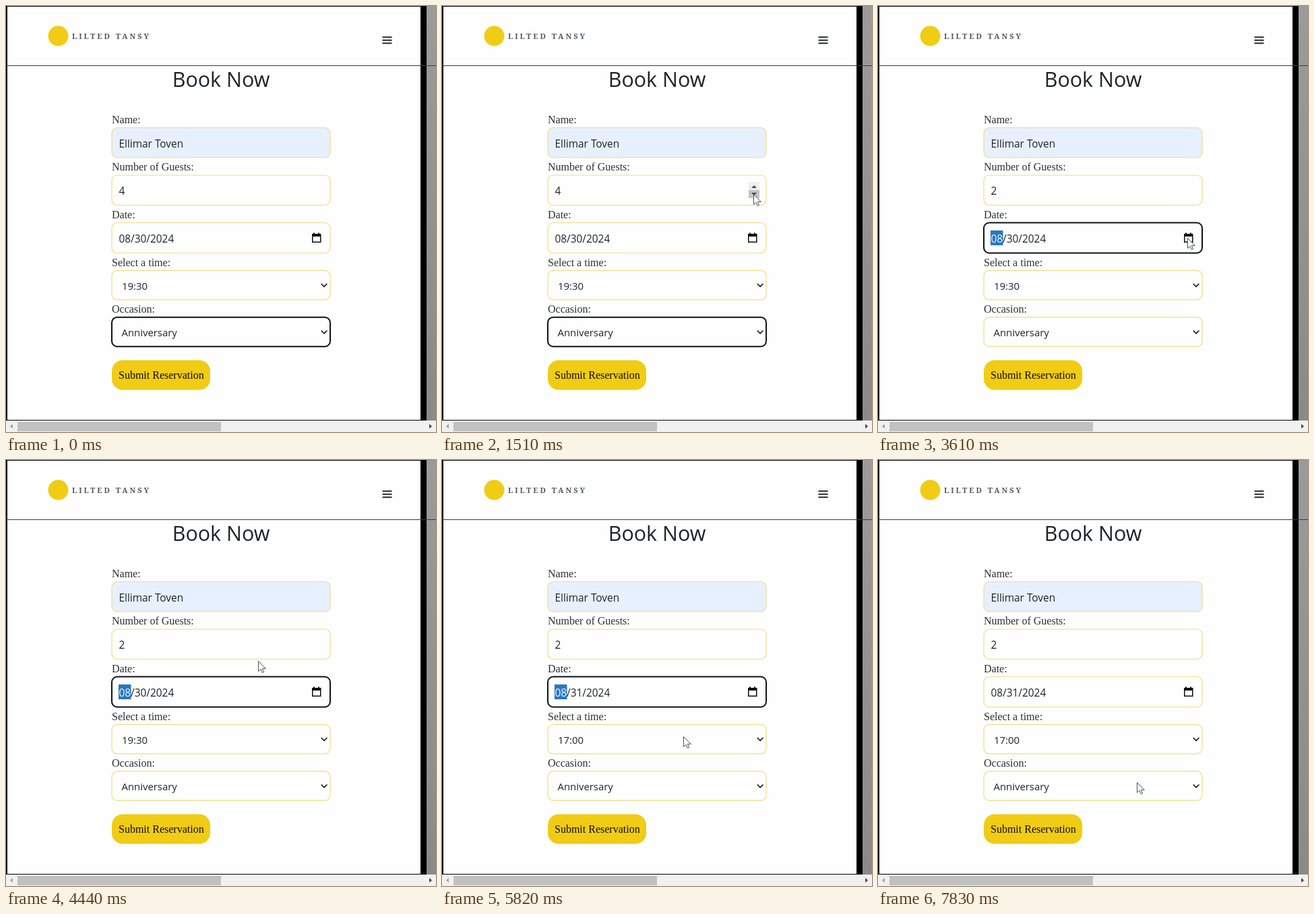
Recreate the animation shown at these times as an HTML page. Size 638 by 632 pixels, loop 8000 ms.

```html
<!DOCTYPE html>
<html lang="en">
<head>
<meta charset="utf-8">
<title>Book Now</title>
<style>
  html, body { margin: 0; width: 100%; height: 100%; overflow: hidden; background: #fefefe; }
  svg { display: block; width: 100%; height: 100%; }
  text { white-space: pre; }
  .sans { font-family: "Open Sans", "Noto Sans", sans-serif; fill: #1f2326; }
  .label { font: 16px "Liberation Serif", "Times New Roman", serif; fill: #2c2f31; }
  .field { stroke: #f2dc80; stroke-width: 1.2; fill: #fefefe; }
  .field.focus { stroke: #101113; stroke-width: 2; }
  .brand { font: bold 11px "Noto Serif", serif; letter-spacing: 3px; fill: #4e565c; }
  .chevron { fill: none; stroke: #15181a; stroke-width: 1.7; }
</style>
</head>
<body>
<svg viewBox="0 0 638 632" preserveAspectRatio="none">
  <defs>
    <linearGradient id="shade" x1="0" y1="0" x2="0" y2="1">
      <stop offset="0" stop-color="#9b9b9b"/>
      <stop offset="1" stop-color="#8a8a8a"/>
    </linearGradient>
  </defs>

  <!-- Page frame -->
  <rect width="638" height="632" fill="#fefefe"/>
  <rect x="623" width="15" height="615" fill="url(#shade)"/>
  <path d="M0 0H624V615H0Z M2 1V614H615V1Z" fill="#000" fill-rule="evenodd"/>
  <rect y="88" width="638" height="1" fill="#3a3a3a"/>

  <!-- Header -->
  <circle cx="77.5" cy="44.5" r="15" fill="#f1cc14"/>
  <text class="brand" x="98" y="49">LILTED TANSY</text>
  <path d="M558.5 46.2h14M558.5 50.7h14M558.5 55.2h14" stroke="#24282b" stroke-width="2"/>
  <text class="sans" x="319" y="120" font-size="30.4" font-weight="500" text-anchor="middle">Book Now</text>

  <!-- Form -->
  <g id="form"></g>
  <g class="sans">
    <text x="167.5" y="209.5" font-size="15.4">Ellimar Toven</text>
    <text id="guests" x="167.5" y="280" font-size="15.4"></text>
    <rect id="mark" x="167" y="333" width="18.5" height="22" fill="#2a77c0"/>
    <text x="167.5" y="350.5" font-size="15.4"><tspan id="month">08</tspan><tspan id="rest"></tspan></text>
    <text id="hour" x="172" y="420.5" font-size="14.9"></text>
    <text x="171.5" y="490" font-size="14.9">Anniversary</text>
  </g>
  <path class="chevron" d="M467.8 412l4.3 4.3l4.3 -4.3M467.8 481.5l4.3 4.3l4.3 -4.3"/>
  <path d="M454 338h2v-1.5h2v1.5h5v-1.5h2v1.5h2.5v13h-13.5Z M455.5 342v7.5h10.5v-7.5Z" fill="#0c0d0e" fill-rule="evenodd"/>
  <g id="spinner">
    <rect x="455" y="261" width="16" height="24" fill="#efefef"/>
    <rect id="down" x="455" y="273" width="16" height="12"/>
    <path d="M459 270h8l-4 -4ZM459 277h8l-4 4Z" fill="#484848"/>
  </g>
  <rect x="157" y="525.5" width="146" height="44" rx="16" fill="#f1cc14"/>
  <text class="label" x="167" y="553" style="fill:#0b0b0b">Submit Reservation</text>

  <!-- Scroll bar -->
  <rect y="615" width="638" height="17" fill="#f1f1f1"/>
  <rect x="17" y="617" width="302" height="14" fill="#c1c1c1"/>
  <path d="M10 620v7l-4 -3.5Z" fill="#a0a0a0"/>
  <path d="M628 620v7l4 -3.5Z" fill="#484848"/>

  <path id="cursor" d="M.5 .5V15.5L4 12.3L6.3 17.6L8.6 16.6L6.3 11.4H11.2Z" fill="#fff" stroke="#4a4f5c" stroke-width="1"/>
</svg>
<script>
const LOOP = 8000;
const $ = id => document.getElementById(id);

const fields = [
  { name: 'name', label: 'Name:', y: 180.5, h: 44.5 },
  { name: 'guests', label: 'Number of Guests:', y: 251, h: 44.5 },
  { name: 'date', label: 'Date:', y: 321.5, h: 45 },
  { name: 'time', label: 'Select a time:', y: 392.3, h: 43.5 },
  { name: 'occasion', label: 'Occasion:', y: 461.7, h: 43.5 }
];

// Cursor stops: time, x, y
const path = [
  [330, 386, 545], [720, 418, 410], [1120, 446, 302], [1220, 446, 302],
  [1510, 462, 279], [2630, 462, 279], [2770, 466, 314], [2800, 466, 314],
  [3250, 459, 344], [4200, 459, 344], [4440, 374, 298], [5300, 374, 298],
  [5820, 358, 410], [5860, 358, 410], [6010, 356, 428], [6110, 356, 428],
  [6510, 354, 526], [6620, 354, 526], [6910, 352, 546], [7650, 352, 546],
  [7830, 384, 478]
];

// Value of the last entry whose time has passed
const focusLog = [[0, 'occasion'], [1880, 'guests'], [3610, 'date'], [7170, '']];
const guestLog = [[0, '4'], [1880, '3'], [2160, '2']];
const current = (log, t) => log.filter(e => e[0] <= t).pop()[1];

function make(tag, attrs) {
  const el = document.createElementNS('http://www.w3.org/2000/svg', tag);
  for (const key in attrs) el.setAttribute(key, attrs[key]);
  return $('form').appendChild(el);
}

for (const f of fields) {
  make('text', { class: 'label', x: 157, y: Math.round(f.y - 6.8) }).textContent = f.label;
  f.box = make('rect', { class: 'field', x: 157, y: f.y, width: 324, height: f.h, rx: 8 });
}
fields[0].box.style.fill = '#e7f0fe';

function cursorAt(t) {
  const i = path.findIndex(p => p[0] > t);
  if (i < 0) return path[path.length - 1].slice(1);
  if (i === 0) return null;
  const [t0, x0, y0] = path[i - 1], [t1, x1, y1] = path[i];
  const k = (t - t0) / (t1 - t0);
  return [Math.round(x0 + (x1 - x0) * k), Math.round(y0 + (y1 - y0) * k)];
}

const inside = (p, x, y, w, h) =>
  p !== null && p[0] >= x && p[0] <= x + w && p[1] >= y && p[1] <= y + h;

const show = (el, on) => el.setAttribute('visibility', on ? 'visible' : 'hidden');

function draw(t) {
  const focus = current(focusLog, t);
  for (const f of fields) f.box.classList.toggle('focus', f.name === focus);

  const picked = t >= 5300;
  $('guests').textContent = current(guestLog, t);
  $('rest').textContent = picked ? '/31/2024' : '/30/2024';
  $('hour').textContent = picked ? '17:00' : '19:30';
  show($('mark'), focus === 'date');
  $('month').setAttribute('fill', focus === 'date' ? '#f4f8fc' : '#1f2326');

  const pos = cursorAt(t);
  show($('cursor'), pos !== null);
  if (pos) $('cursor').setAttribute('transform', `translate(${pos[0]} ${pos[1]})`);

  const pressed = (t >= 1880 && t < 2020) || (t >= 2160 && t < 2320);
  const hover = inside(pos, 455, 273, 16, 12);
  show($('spinner'), focus === 'guests' || inside(pos, 157, 251, 324, 45));
  $('down').setAttribute('fill', pressed ? '#a6a6a6' : hover ? '#c4c4c4' : '#efefef');
}

function tick() {
  draw(performance.now() % LOOP);
  requestAnimationFrame(tick);
}
tick();
</script>
</body>
</html>
```
